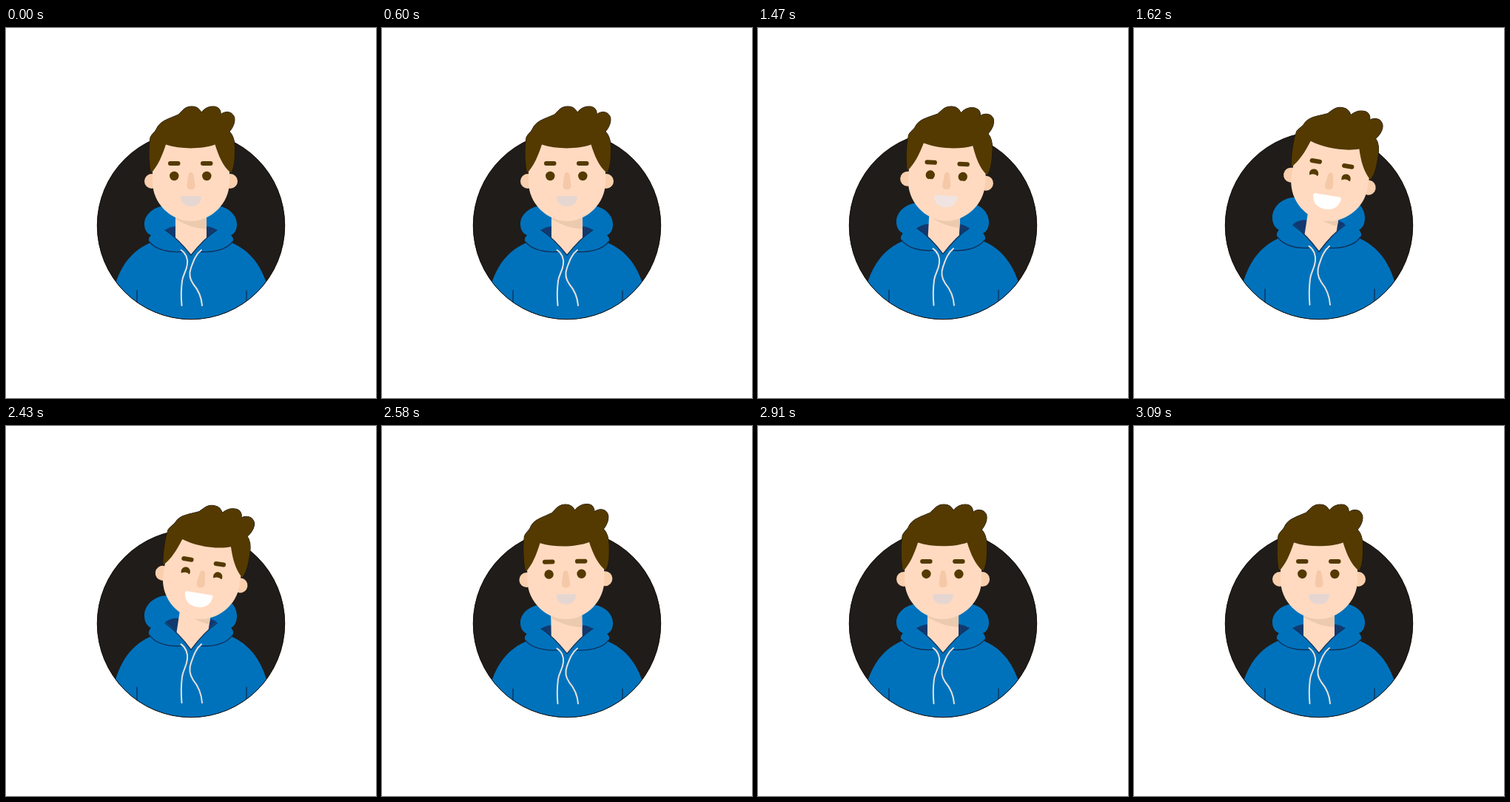
Write an HTML page that moves like this. It is 500x500 px and loops after 3630 ms.

```html
<!DOCTYPE html>
<html lang="en">
<head>
<meta charset="utf-8">
<title>Smiling avatar</title>
<style>
  html, body { margin: 0; width: 100%; height: 100%; overflow: hidden; background: #fff; }
  svg { display: block; width: 100%; height: 100%; }
  .skin { fill: #ffdac0; }
  .ear { fill: #f9cfae; }
  .hair { fill: #543a00; }
  .cloth { fill: #0072bc; }
  .seam { fill: none; stroke: #123159; stroke-width: 1.3; stroke-linecap: round; }
  .cord { fill: none; stroke: #e6e0dc; stroke-width: 2; stroke-linecap: round; }
  .edge { stroke: #15110c; stroke-width: 1; }
</style>
</head>
<body>
<svg viewBox="0 0 500 500">
  <defs>
    <clipPath id="disc"><circle cx="250" cy="267" r="127"/></clipPath>
    <clipPath id="opening">
      <path d="M200 200V273H215Q232 284 250 307Q268 284 285 273H300V200Z"/>
    </clipPath>
    <path id="hairdo" d="M196 196C193 180 193 162 195 148C197 143 201 141 203 137C208 125 220 123 233 117C239 111 242 106 251 106C258 106 261 109 264 114C269 108 274 106 280 106C287 106 291 111 290 117C294 113 302 112 306 116.500C312 122 308 133 302 140C307 145 309 152 309 162C309 176 309 187 304 196C293 187 287 172 282.500 157.500C264 164 236 164 216 157.500C211 173 205 187 196 196Z"/>
  </defs>

  <circle cx="250" cy="267" r="127" fill="#201c19"/>

  <g clip-path="url(#disc)">
    <g id="body">
      <path class="cloth" d="M146 352C155 318 174 296 204 287H296C326 296 345 318 354 352V400H146Z"/>
      <path class="seam" d="M177 355V380M325 355V380"/>
      <g id="hood">
        <path class="cloth" d="M250 244C240 242 230 240 219 240C200 240 187 252 187 265C187 273 191 278 196 280C193 283 192 286 194 289C202 299 222 303 241 302L250 307L259 302C278 303 298 299 306 289C308 286 307 283 304 280C309 278 312 273 312 265C312 252 299 240 281 240C270 240 260 242 250 244Z"/>
        <path class="seam" d="M194 289C202 300 222 304 239 302M306 289C298 300 278 304 261 302"/>
        <path fill="#11396f" d="M215 273Q222 268 231 268H269Q278 268 285 273Q268 284 250 307Q232 284 215 273Z"/>
      </g>
      <g clip-path="url(#opening)">
        <g id="neck">
          <path class="skin" d="M229 235H271V325H229Z"/>
          <path fill="#eccaae" d="M229 250H271V272Q247 270 229 258Z"/>
        </g>
      </g>
      <path class="seam" d="M215 273Q232 284 250 307Q268 284 285 273"/>
      <path class="cord" d="M236.500 300C243 304 246 312 245 319C244 329 239 333 238 342C236.500 353 236.500 364 237.500 375"/>
      <path class="cord" d="M264 300C256 306 253 316 250 324C247 332 248 339 253 346C259 353 264 361 265 375"/>
    </g>
  </g>
  <circle class="edge" cx="250" cy="267" r="126.700" fill="none"/>

  <g id="head">
    <use class="hair edge" href="#hairdo"/>
    <circle class="ear" cx="197" cy="207" r="10"/>
    <circle class="ear" cx="303" cy="207" r="10"/>
    <path class="skin" d="M198 155H302V208C302 237 277 261 250 261C223 261 198 237 198 208Z"/>
    <use class="hair" href="#hairdo"/>
    <g class="hair">
      <rect x="219" y="180" width="16.500" height="6" rx="3"/>
      <rect x="263" y="180" width="16.500" height="6" rx="3"/>
      <g id="eyes">
        <circle cx="227.300" cy="200" r="6.200"/>
        <circle cx="271.300" cy="200" r="6.200"/>
      </g>
    </g>
    <g id="cheeks" class="skin">
      <ellipse cx="227.300" cy="213" rx="7" ry="5"/>
      <ellipse cx="271.300" cy="213" rx="7" ry="5"/>
    </g>
    <path fill="#f5c9a8" d="M250 195C253 195 254 199 254.500 205C255 209 255.500 210 255.500 213C255.500 217 253 218.500 250 218.500C247 218.500 244.500 217 244.500 213C244.500 210 245 209 245.500 205C246 199 247 195 250 195Z"/>
    <path id="mouth" d="M-12 0H12Q14 0 14 2C13 10 8 14 0 14C-8 14 -13 10 -14 2Q-14 0 -12 0Z"/>
  </g>
</svg>
<script>
  const LOOP = 3630, STEP = 30;
  const part = id => document.getElementById(id);
  const [body, hood, neck, head, eyes, cheeks, mouth] =
    ['body', 'hood', 'neck', 'head', 'eyes', 'cheeks', 'mouth'].map(part);

  const clamp = x => Math.min(1, Math.max(0, x));
  const mix = (a, b, k) => a + (b - a) * k;
  const easeInOut = x => x < 0.5 ? 4 * x ** 3 : 1 - 4 * (1 - x) ** 3;
  const elasticOut = x => x >= 1 ? 1
    : 1 + 2 ** (-10 * x) * Math.sin((x - 0.075) * 2 * Math.PI / 0.3);

  const set = (el, transform) => el.setAttribute('transform', transform);
  const stretchY = (el, y, k) => set(el, `translate(0 ${y}) scale(1 ${k}) translate(0 ${-y})`);

  // 0 is the resting pose, 1 the full grin with raised shoulders
  function smileAt(t) {
    if (t < 2428) return easeInOut(clamp((t - 1350) / 270));
    return 1 - elasticOut((t - 2428) / 750);
  }

  function blinkAt(t) {
    return Math.sin(Math.PI * clamp((t - 400) / 200));
  }

  function draw(t) {
    const smile = smileAt(t);
    const tone = clamp(smile);
    const tilt = `translate(0 ${-smile}) rotate(${9.2 * smile} 250 297)`;
    set(head, tilt);
    set(neck, tilt);
    stretchY(body, 394, 1 + 0.055 * smile);
    stretchY(hood, 306, 1 + 0.04 * smile);
    stretchY(eyes, 200, 1 - 0.9 * blinkAt(t));
    set(cheeks, `translate(0 ${-7 * tone})`);
    set(mouth, `translate(250 ${mix(227, 226, smile)}) scale(${1 + 0.36 * smile})`);
    mouth.setAttribute('fill', `rgb(${[230, 214, 209].map(c => mix(c, 255, tone)).join()})`);
  }

  const start = performance.now();
  function tick() {
    const t = (performance.now() - start) % LOOP;
    draw(Math.floor(t / STEP) * STEP);
    requestAnimationFrame(tick);
  }
  tick();
</script>
</body>
</html>
```
